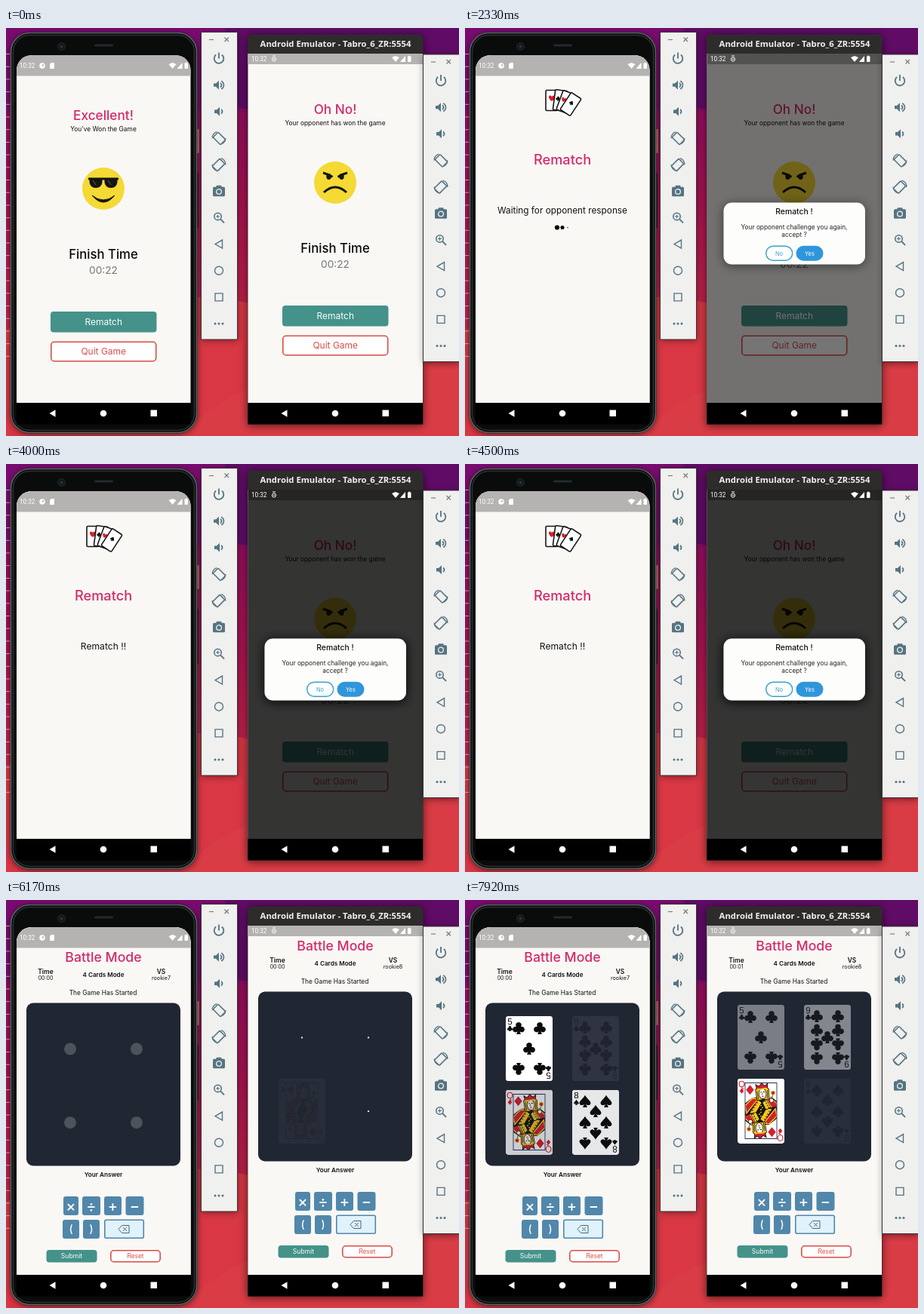
Write an HTML page with a canvas that moves like this. It is 600 px wide and 541 px high and loops after 8 s.

```html
<!DOCTYPE html>
<html lang="en">
<head>
<meta charset="utf-8">
<title>Card battle rematch</title>
<style>
html, body { margin: 0; width: 100%; height: 100%; overflow: hidden; background: #8b0d5a; }
canvas { display: block; width: 600px; height: 541px; }
</style>
</head>
<body>
<canvas id="stage"></canvas>
<script>
const W = 600, H = 541, LOOP = 8000, FPS = 12;
const PAGE = '#f9f8f5', PINK = '#d4296b', TEAL = '#45928a', RED = '#db4c47', BLUE = '#5187aa', SLATE = '#557481';
const stage = document.getElementById('stage');
const dpr = window.devicePixelRatio || 1;
stage.width = W * dpr;
stage.height = H * dpr;
let c = stage.getContext('2d');
c.scale(dpr, dpr);

const clamp = v => Math.max(0, Math.min(1, v));
const ramp = (t, start, dur) => clamp((t - start) / dur);

function at(x, y, fn, angle = 0) {
  c.save();
  c.translate(x, y);
  c.rotate(angle);
  fn();
  c.restore();
}

function faded(alpha, fn) {
  if (alpha <= 0) return;
  c.save();
  c.globalAlpha *= alpha;
  fn();
  c.restore();
}

function paint(fill, stroke, width = 1) {
  if (fill) { c.fillStyle = fill; c.fill(); }
  if (stroke) { c.strokeStyle = stroke; c.lineWidth = width; c.stroke(); }
}

function box(x, y, w, h, r, fill, stroke, width) {
  c.beginPath();
  c.roundRect(x, y, w, h, r);
  paint(fill, stroke, width);
}

function disc(x, y, r, fill, stroke, width) {
  c.beginPath();
  c.arc(x, y, r, 0, 7);
  paint(fill, stroke, width);
}

function arc(x, y, r, a, b, color, width) {
  c.beginPath();
  c.arc(x, y, r, a, b);
  paint(null, color, width);
}

function poly(points, fill, stroke, width, open) {
  c.beginPath();
  for (let i = 0; i < points.length; i += 2) c.lineTo(points[i], points[i + 1]);
  if (!open) c.closePath();
  paint(fill, stroke, width);
}

const line = (points, color, width) => poly(points, null, color, width, true);

function text(str, x, y, size, color = '#111', weight = 400, family = 'Inter', align = 'center') {
  c.font = `${weight} ${size}px "${family}", sans-serif`;
  c.textAlign = align;
  c.fillStyle = color;
  c.fillText(str, x, y + size * 0.36);
}

function shadowed(blur, alpha, fn) {
  c.save();
  c.shadowColor = `rgba(0,0,0,${alpha})`;
  c.shadowBlur = blur * dpr;
  c.shadowOffsetY = 2 * dpr;
  fn();
  c.restore();
}

// Suits, drawn in a unit square around the origin
const suits = {
  diamond() { poly([0, -.5, .4, 0, 0, .5, -.4, 0], '#d81e2c'); },
  heart() {
    c.beginPath();
    c.moveTo(0, .5);
    c.bezierCurveTo(-.9, -.1, -.4, -.8, 0, -.25);
    c.bezierCurveTo(.4, -.8, .9, -.1, 0, .5);
    paint('#d81e2c');
  },
  spade() {
    c.beginPath();
    c.moveTo(0, -.5);
    c.bezierCurveTo(.2, -.15, .5, 0, .46, .2);
    c.bezierCurveTo(.4, .4, .12, .36, .05, .2);
    c.lineTo(.18, .5);
    c.lineTo(-.18, .5);
    c.lineTo(-.05, .2);
    c.bezierCurveTo(-.12, .36, -.4, .4, -.46, .2);
    c.bezierCurveTo(-.5, 0, -.2, -.15, 0, -.5);
    paint('#0b0b0b');
  },
  club() {
    for (const [x, y] of [[0, -.26], [-.26, .1], [.26, .1], [0, 0]]) disc(x, y, .235, '#0b0b0b');
    poly([0, 0, .18, .5, -.18, .5], '#0b0b0b');
  }
};

function pip(suit, x, y, size, angle = 0) {
  at(x, y, () => { c.scale(size, size); suits[suit](); }, angle);
}

// Playing cards, 62 by 86
const CW = 62, CH = 86, RES = 2 * dpr;

function courtHalf() {
  c.save();
  poly([10, 6, 52, 6, 52, 37, 10, 49]);
  c.clip();
  poly([10, 49, 10, 33, 20, 25, 44, 24, 52, 30, 52, 38], '#161616');
  poly([10, 36, 20, 26, 27, 27, 12, 46], '#d3202e', '#f2c91f', 1.4);
  poly([52, 38, 52, 33, 43, 25, 38, 27, 46, 40], '#d3202e', '#f2c91f', 1.4);
  poly([27, 28, 32, 32, 24, 46, 16, 46], '#f2c91f', '#111', .6);
  poly([38, 27, 33, 32, 38, 42, 44, 38], '#f2c91f', '#111', .6);
  for (let i = 0; i < 4; i++) {
    disc(26 - i * 2, 32 + i * 3.4, 1, '#c22');
    disc(37 + i * 1.4, 30 + i * 2.8, .9, '#27315c');
    disc(31 + i % 2 * 2, 36 + i * 2.6, .9, '#f2c91f');
  }
  // Head, leaning to one side
  at(33, 19, () => {
    poly([-9, -5, -5, -9, 5, -9, 9, -4, 8, 9, -8, 9], '#efc526', '#111', .8);
    line([-7, -3, -6, 8], '#111', .8);
    line([7, -3, 6, 8], '#111', .8);
    c.beginPath();
    c.ellipse(0, 1, 4.8, 7, 0, 0, 7);
    paint('#fffaf0', '#111', .7);
    for (const x of [-2, 2]) line([x - 1, -1, x + 1, -1], '#111', .9);
    line([0, -.5, -.6, 2.5, .5, 2.5], '#111', .5);
    line([-1.3, 4.6, 1.3, 4.6], '#c22', .8);
    poly([-7, -5, -8, -12, -4, -9, 0, -13, 4, -9, 8, -12, 7, -5], '#d3202e', '#111', .8);
    line([-7, -5.3, 7, -5.3], '#f2c91f', 1.8);
  }, -.1);
  line([45, 29, 47, 20], '#207040', 1);
  disc(45, 29, 2.6, '#fffaf0', '#111', .6);
  disc(47, 19, 2.6, '#d3202e', '#f2c91f', 1);
  pip('diamond', 16.5, 15, 13);
  c.restore();
}

function makeCard(rank, suit, spots) {
  const canvas = document.createElement('canvas');
  canvas.width = CW * RES;
  canvas.height = CH * RES;
  const main = c;
  c = canvas.getContext('2d');
  c.scale(RES, RES);
  box(0, 0, CW, CH, 3, '#fff');
  const half = () => {
    text(rank, 5.5, 7.5, 11.5, suit === 'diamond' ? '#d81e2c' : '#0b0b0b', 500, 'Liberation Sans');
    pip(suit, 5.5, 16.5, 7);
    if (!spots) courtHalf();
  };
  half();
  at(CW, CH, half, Math.PI);
  if (spots) {
    for (const [x, y] of spots) pip(suit, x, y, 16, y > 43 ? Math.PI : 0);
  } else {
    line([10, 49, 52, 37], '#111', .8);
    box(10, 6, 42, 74, 0, null, '#27315c', .9);
  }
  c = main;
  return canvas;
}

const pairs = ys => ys.flatMap(y => [[17, y], [45, y]]);
const deck = [
  makeCard('5', 'club', [...pairs([16, 70]), [31, 43]]),
  makeCard('9', 'club', [...pairs([15, 33.5, 52.5, 71]), [31, 43]]),
  makeCard('Q', 'diamond'),
  makeCard('8', 'spade', [...pairs([15, 43, 71]), [31, 28], [31, 58]])
];

// Desktop
function wallpaper() {
  const g = c.createLinearGradient(0, 0, 0, H);
  const stops = [[0, '#790b70'], [.19, '#7c0c68'], [.21, '#930d5e'], [.45, '#a9134f'], [.66, '#bd2049'], [1, '#d63a45']];
  stops.forEach(([p, color]) => g.addColorStop(p, color));
  c.fillStyle = g;
  c.fillRect(0, 0, W, H);
  c.beginPath();
  c.moveTo(290, 0);
  c.lineTo(W, 0);
  c.lineTo(W, 60);
  c.quadraticCurveTo(420, 130, 300, 104);
  paint('#600b66');
  c.beginPath();
  c.moveTo(0, 400);
  c.quadraticCurveTo(170, 335, 330, 366);
  c.quadraticCurveTo(470, 400, W, 350);
  c.lineTo(W, H);
  c.lineTo(0, H);
  paint('#d83743');
  c.beginPath();
  c.moveTo(230, H);
  c.quadraticCurveTo(330, 430, W, 446);
  c.lineTo(W, H);
  paint('#da3c45');
  for (let y = 34.5; y < 442; y += 16.7) line([0, y, 6, y], 'rgba(255,225,235,.7)', 1);
}

function speaker(x, waves) {
  poly([x - 6, -2.2, x - 3, -2.2, x + 1, -6, x + 1, 6, x - 3, 2.2, x - 6, 2.2], SLATE);
  arc(x + 1.5, 0, 3, -1.1, 1.1, SLATE, 1.8);
  if (waves > 1) arc(x + 1.5, 0, 6, -1.1, 1.1, SLATE, 1.6);
}

function rotateIcon(dir) {
  c.scale(dir, 1);
  at(.5, .5, () => box(-4.8, -7, 9.6, 14, 1.2, null, SLATE, 1.6), -Math.PI / 4);
  arc(0, 0, 8.8, 3.1, 4.4, SLATE, 1.3);
  arc(0, 0, 8.8, 0, 1.1, SLATE, 1.2);
}

const tools = [
  () => { arc(0, 0, 6.3, -.9, 4.04, SLATE, 1.8); line([0, -8, 0, 0], SLATE, 1.8); },
  () => speaker(-1, 2),
  () => speaker(0, 1),
  () => rotateIcon(1),
  () => rotateIcon(-1),
  () => {
    box(-8, -5.5, 16, 12.5, 1.5, SLATE);
    box(-3.5, -7.5, 7, 4, 1, SLATE);
    disc(0, .8, 3.4, SLATE, '#f0f0ef', 1.3);
  },
  () => {
    disc(-1.5, -1.5, 4.7, null, SLATE, 1.6);
    line([2, 2, 7, 7], SLATE, 2);
    line([-4, -1.5, 1, -1.5], SLATE, 1.1);
    line([-1.5, -4, -1.5, 1], SLATE, 1.1);
  },
  () => poly([-5, 0, 4.5, -5.5, 4.5, 5.5], null, SLATE, 1.4),
  () => disc(0, 0, 5.5, null, SLATE, 1.4),
  () => box(-5, -5, 10, 10, 0, null, SLATE, 1.4),
  () => [-5, 0, 5].forEach(x => disc(x, 0, 1.5, SLATE))
];

function toolbar(x, y) {
  at(x, y, () => {
    shadowed(9, .45, () => box(.5, .5, 48, 407.5, 0, '#f0f0ef'));
    box(.5, .5, 48, 407.5, 0, null, '#3b3235', 1);
    line([11, 10.5, 17, 10.5], '#777', 1.1);
    line([31.5, 7.5, 37, 13], '#777', 1.1);
    line([37, 7.5, 31.5, 13], '#777', 1.1);
    tools.forEach((draw, i) => at(24, 35.5 + i * 35.15, draw));
  });
}

function statusIcons(x, y) {
  poly([x - 5, y - 2, x, y - 4, x + 5, y - 2, x, y + 4], '#fff');
  poly([x + 6, y + 4, x + 13, y - 4, x + 13, y + 4], '#fff');
  box(x + 16, y - 3.5, 4.5, 7.5, .8, '#fff');
  box(x + 17.2, y - 4.3, 2, 2, 0, '#fff');
}

function navBar(x, w) {
  c.fillStyle = '#000';
  c.fillRect(x, 497, w, 28.5);
}

function navIcons(x) {
  poly([x - 71.5, 511, x - 63.5, 506.2, x - 63.5, 515.8], '#fff');
  disc(x, 511, 4.3, '#fff');
  box(x + 62.5, 506.5, 8.5, 8.5, 0, '#fff');
}

// App pages, laid out around x = 129
function button(label, x, y, w, h, size, solid) {
  if (solid) box(x, y, w, h, 4, TEAL);
  else box(x + .8, y + .8, w - 1.6, h - 1.6, 4, '#fff', RED, 1.6);
  text(label, x + w / 2, y + h / 2, size, solid ? '#f4fffd' : RED);
}

function coolFace() {
  box(-20, -14.5, 40, 3, 1, '#151515');
  for (const x of [-10, 10]) box(x - 8.5, -14, 17, 13, [2, 2, 8, 8], '#151515');
  line([-14, -11, -10, -5], '#6c6540', 1);
  line([6, -11, 10, -5], '#6c6540', 1);
  c.beginPath();
  c.moveTo(-15, 9);
  c.quadraticCurveTo(0, 21, 15, 9);
  c.quadraticCurveTo(0, 27, -15, 9);
  paint('#151515', '#151515', 1);
}

function angryFace() {
  for (const s of [-1, 1]) {
    c.beginPath();
    c.moveTo(s * 16, -13);
    c.quadraticCurveTo(s * 9, -11, s * 3.5, -7.5);
    paint(null, '#151515', 3);
    c.beginPath();
    c.ellipse(s * 8.5, -8, 3.2, 4, 0, 0, 7);
    paint('#151515');
  }
  c.beginPath();
  c.moveTo(-15, 13);
  c.quadraticCurveTo(0, -1, 15, 13);
  paint(null, '#151515', 3);
}

function resultPage(title, note, face) {
  text(title, 129, 116, 17.2, PINK, 500);
  text(note, 129, 134, 8.4);
  at(129, 213, () => { disc(0, 0, 28, '#f5d935'); face(); });
  text('Finish Time', 129, 300, 16.7, '#080808', 500);
  text('00:22', 129, 321.5, 13.7, '#777');
  button('Rematch', 59, 376, 140.5, 27.5, 12, true);
  button('Quit Game', 59, 415.5, 140.5, 27, 12, false);
}

function waitPage(t, accepted) {
  const fan = [['heart', 115, 96, 0], ['club', 126, 96, .13], ['heart', 133, 98, .35], ['spade', 140, 101, .58]];
  fan.forEach(([suit, x, y, angle], i) => at(x, y, () => {
    box(-8, -13.5, 16, 27, 1.5, '#fff', '#151515', 1.6);
    pip(suit, i % 3 ? -3 : 0, i ? -2 : -3, i ? 6 : 8);
  }, angle));
  text('Rematch', 129, 174.5, 18.2, PINK, 500);
  if (accepted) {
    text('Rematch !!', 129, 242, 12.1);
    return;
  }
  text('Waiting for opponent response', 129, 242, 11.8);
  const phase = .65 + (t - 1420) / 1400;
  for (let i = 0; i < 3; i++) {
    const s = (Math.sin((phase - i * .2) * 2 * Math.PI) + 1) / 2;
    disc(122 + i * 7, 264.5, 3.2 * s, '#080808');
  }
}

function keypad() {
  [[76, 20, '×'], [101, 24, '÷'], [130, 23, '+'], [158.5, 24, '−']].forEach(([x, w, s]) => {
    box(x, 393, w, 25, 3, BLUE);
    text(s, x + w / 2, 405.5, 20, '#fff', 500);
  });
  [[75, '('], [102, ')']].forEach(([x, s]) => {
    box(x, 424, 22, 25, 3, BLUE);
    text(s, x + 11, 436, 14, '#fff', 500);
  });
  box(130.8, 424.3, 51.5, 24, 2, '#e0f2fb', BLUE, 1.6);
  poly([149, 436.5, 153.5, 431.5, 163, 431.5, 163, 441.5, 153.5, 441.5], null, '#48697b', 1);
  line([155, 434, 160, 439], '#48697b', 1);
  line([160, 434, 155, 439], '#48697b', 1);
}

function gamePage(t, side) {
  text('Battle Mode', 129, 76, 17.7, PINK, 500);
  text('Time', 52.5, 95, 8.5, '#111', 600);
  text(t >= side.tick ? '00:01' : '00:00', 52.5, 103, 7);
  text('4 Cards Mode', 129, 99, 8.1, '#111', 600);
  text('VS', 205.5, 95, 8.3, '#111', 600);
  text(side.rival, 205.5, 103.3, 7.2);
  text('The Game Has Started', 128.5, 122.5, 8.4);
  box(27, 136.5, 204, 216 + side.extra, 9, '#212633');
  side.cards.forEach(([start, dur], i) => {
    const x = 54 + (i % 2) * 88, y = 154 + (i >> 1) * 97.7;
    const pulse = (((t - 6750) / 1000 + side.pulse) % 1 + 1) % 1;
    if (t < start && !(side.late === i && t > 6700)) {
      disc(x + 31, y + 43.5, 10 * pulse, `rgba(255,255,255,${1 - pulse})`);
    }
    faded(ramp(t, start, dur), () => c.drawImage(deck[i], x, y, CW, CH));
  });
  at(0, side.extra, () => {
    text('Your Answer', 129, 364, 8.2, '#111', 600);
    keypad();
    button('Submit', 53.5, 464, 67, 16.5, 8.6, true);
    button('Reset', 138, 464, 67, 16.5, 8.3, false);
  });
}

// Each card: fade start and duration; extra is the taller board's added height
const leftSide = {
  rival: 'rookie7', pulse: .38, tick: LOOP, extra: 0,
  cards: [[6400, 1060], [7800, 1770], [6610, 1700], [6450, 1650]]
};
const rightSide = {
  rival: 'rookie8', pulse: .7, tick: 7300, late: 0, extra: 9,
  cards: [[7200, 1770], [7130, 1770], [6150, 500], [7850, 1770]]
};

function dialog() {
  shadowed(14, .5, () => box(342.5, 231.5, 187.5, 82, 11, '#fdfdfc'));
  text('Rematch !', 436, 243, 10.4, '#111', 500);
  text('Your opponent challenge you again,', 436, 264, 8.3, '#222');
  text('accept ?', 436, 274.5, 8.3, '#222');
  box(398.7, 289.2, 35, 19, 9.5, '#fff', '#38a3c6', 1.4);
  text('No', 416, 299, 7.5, '#38a3c6');
  box(438.5, 288.7, 36, 20, 10, '#2f96da');
  text('Yes', 456.5, 299, 7.5, '#fff');
}

function leftPhone(t) {
  box(253, 134, 2.5, 32, 1, '#d98a72');
  box(252, 192, 3, 73, 1, '#2a1a22');
  shadowed(8, .5, () => box(5.5, 5.5, 248, 532, 26, '#111'));
  box(6.5, 6.5, 246, 530, 25, '#0a0b0b', '#5d6466', 1.6);
  box(9.5, 9.5, 240, 524, 22, null, '#2b3032', 1.5);
  box(117, 21.5, 25, 3, 1.5, '#25292b');
  disc(73.5, 24.5, 5, '#15191b', '#22292c', 1);
  disc(73.5, 24.5, 1.6, '#2d3c46');
  navBar(14, 230.5);
  c.save();
  c.beginPath();
  c.roundRect(14, 36, 230.5, 461, [20, 20, 0, 0]);
  c.clip();
  const sheet = draw => {
    c.fillStyle = PAGE;
    c.fillRect(14, 36, 231, 461);
    draw();
  };
  sheet(() => resultPage('Excellent!', "You've Won the Game", coolFace));
  faded(ramp(t, 580, 250), () => sheet(() => waitPage(t, t >= 3750)));
  faded(ramp(t, 5900, 250), () => sheet(() => gamePage(t, leftSide)));
  c.fillStyle = '#b4b3b1';
  c.fillRect(14, 36, 231, 27.5);
  c.restore();
  text('10:32', 18, 50, 8.2, '#fff', 400, 'Roboto', 'left');
  disc(48, 50, 3.8, '#fff');
  box(48, 48.3, 2.2, 2.2, 0, '#b4b3b1');
  poly([58, 48, 60, 46, 64, 46, 64, 54, 58, 54], '#fff');
  statusIcons(220.5, 50);
  navIcons(129);
}

function rightWindow(t) {
  shadowed(12, .6, () => box(320, 8.5, 232.5, 517, [6, 6, 0, 0], '#2e2c2b'));
  text('Android Emulator - Tabro_6_ZR:5554', 436.5, 21.3, 11.3, '#f3f1ef', 700, 'Noto Sans');
  c.save();
  c.beginPath();
  c.rect(320.5, 34, 231.5, 463);
  c.clip();
  const sheet = (dy, draw) => {
    c.fillStyle = PAGE;
    c.fillRect(320, 34, 233, 463);
    at(307, dy, draw);
    c.fillStyle = '#b4b3b1';
    c.fillRect(320, 34, 233, 14);
  };
  sheet(-8, () => resultPage('Oh No!', 'Your opponent has won the game', angryFace));
  for (const start of [2000, 3580]) {
    faded(ramp(t, start, 200), () => {
      c.fillStyle = 'rgba(0,0,0,.54)';
      c.fillRect(320, 34, 233, 463);
      dialog();
    });
  }
  faded(ramp(t, 5900, 250), () => sheet(-15, () => gamePage(t, rightSide)));
  c.restore();
  text('10:32', 325, 41.3, 8.2, '#fff', 400, 'Roboto', 'left');
  disc(355, 41.5, 2.6, null, '#fff', 1);
  line([353, 37, 357, 37], '#fff', 1);
  line([353.5, 41.5, 356.5, 41.5], '#fff', .8);
  statusIcons(516, 41);
  navBar(320.5, 231.5);
  navIcons(436);
}

function frame() {
  const now = performance.now() % LOOP;
  const t = Math.floor(now * FPS / 1000 + .05) * 1000 / FPS;
  wallpaper();
  leftPhone(t);
  toolbar(258, 5);
  rightWindow(t);
  toolbar(552, 34.5);
  requestAnimationFrame(frame);
}
frame();
</script>
</body>
</html>
```
